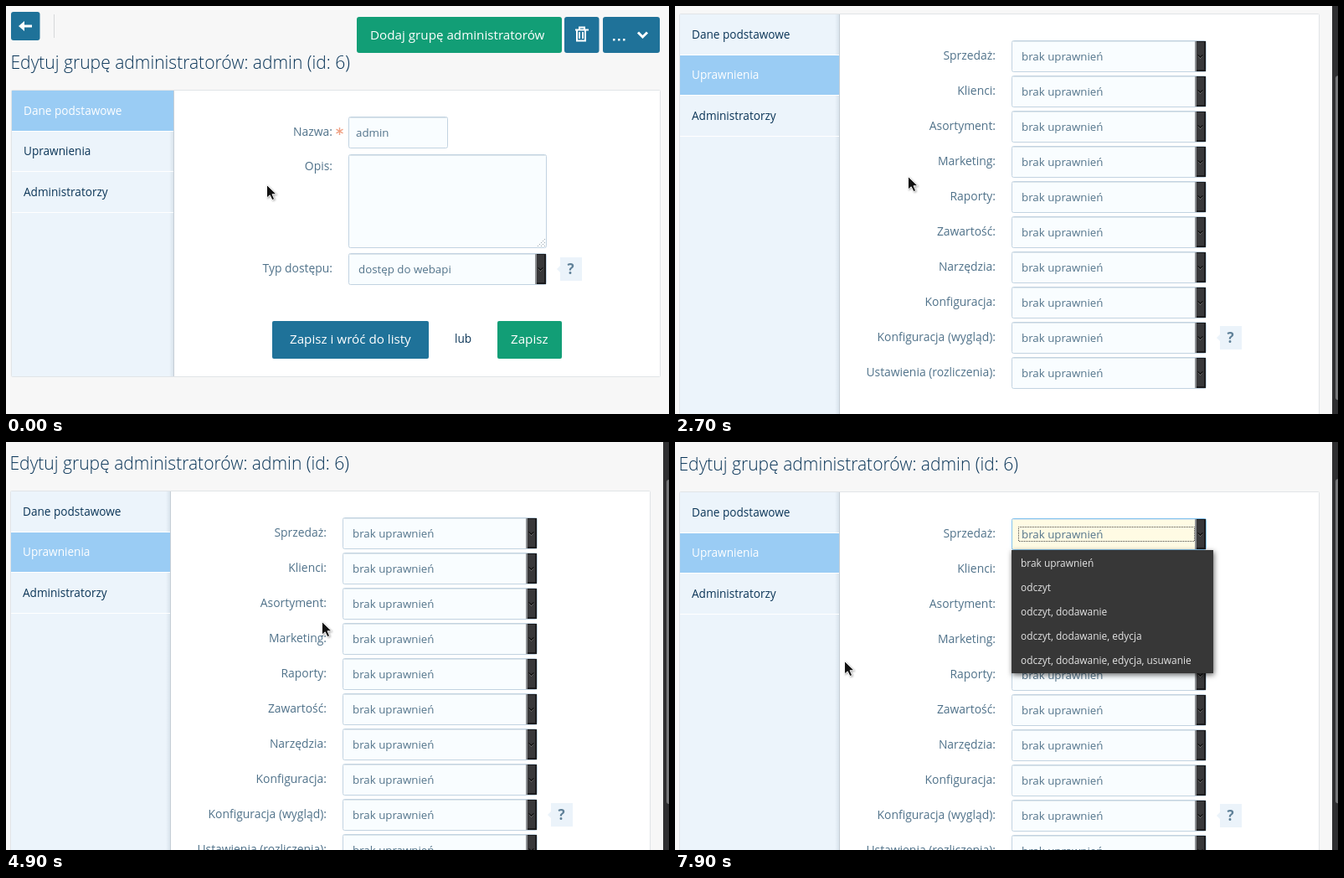
These frames come from a looping animation (792 px wide and 487 px high, 8 s). An HTML page:

```html
<!DOCTYPE html>
<html lang="pl">
<head>
<meta charset="utf-8">
<style>
  html, body { margin: 0; width: 100%; height: 100%; overflow: hidden; background: #f7f7f7; }
  svg { display: block; }
  text { font: 13.3px "Open Sans", sans-serif; fill: #53748b; white-space: pre; }
  .title { font-size: 21.05px; font-weight: 300; fill: #0b3659; }
  .button { font-size: 15.2px; fill: #fff; }
  .nav { font-size: 13.6px; fill: #0b3557; }
  .active { fill: #fff; }
  .label { font-size: 13.9px; fill: #50728a; text-anchor: end; }
  .help { font-size: 17px; font-weight: 700; fill: #5f8098; }
  .option { font-size: 11.92px; fill: #e4e4e4; }
  .field { fill: #f9fdff; stroke: #c2d3e1; }
  .icon { fill: none; stroke: #fff; stroke-width: 2; }
  #focus .field { fill: #fffbe4; stroke: #83c3ee; }
  #menu { filter: drop-shadow(1px 2px 3px #0009); }
</style>
</head>
<body>
<svg id="stage" width="792" height="487" viewBox="0 0 792 487"></svg>
<script>
const BLUE = '#1f7299', GREEN = '#129e76';

const rect = (x, y, w, h, fill, r = 0, more = '') =>
  `<rect x="${x}" y="${y}" width="${w}" height="${h}" fill="${fill}" rx="${r}" ${more}/>`;
const text = (x, y, s, cls = '') => `<text x="${x}" y="${y}" class="${cls}">${s}</text>`;
const path = (d, more = 'class="icon"') => `<path d="${d}" ${more}/>`;
const group = (id, body, more = '') => `<g id="${id}" ${more}>${body}</g>`;

const field = (x, y, w, h) =>
  rect(x + .5, y + .5, w - 1, h - 1, '', 2, 'class="field"') +
  rect(x + 1, y + 1, w - 2, 1, '#dde6ec');

const select = (x, y, w, value) => field(x, y, w, 38) +
  rect(x + w - 14, y + 1, 13, 36, '#1c1c1e') +
  rect(x + w - 14, y + 1, 2, 36, '#8d9093') +
  rect(x + w - 12, y + 2, 9, 33, '#38383a') +
  path(`M${x + w - 10.5} ${y + 18.5}l3 3 3-3`, 'fill="none" stroke="#aaa" stroke-width=".7"') +
  path(`M${x + w - 10.5} ${y + 17.5}l3 3 3-3`, 'fill="none" stroke="#0b0b0b" stroke-width="1.2"') +
  text(x + 12, y + 24, value);

const help = (x, y) => rect(x, y, 26, 28, '#ebf3fa') +
  path(`M${x} ${y + 10}l-4 4 4 4z`, 'fill="#ebf3fa"') + text(x + 8.5, y + 20, '?', 'help');

const header = (x, y, right, titleY) =>
  rect(x, 7, 34.5, 34, BLUE, 3) +
  path(`M${x + 25} 24H${x + 12}`, 'class="icon" style="stroke-width:3"') +
  path(`M${x + 9} 24l7-6v12z`, 'fill="#fff"') +
  rect(57, 10, 1, 28, '#d6d8da') +
  rect(right - 362, y, 245, 43, GREEN, 3) +
  text(right - 346, y + 27, 'Dodaj grupę administratorów', 'button') +
  rect(right - 114, y, 41.5, 43, BLUE, 3) +
  path(`M${right - 101} ${y + 15.5}h16m-11-1v-2h6v2m-9 2v12h10v-12m-7 1.5v8m4-8v8`) +
  rect(right - 68, y, 68, 43, BLUE, 3) +
  [0, 6, 12].map(d => rect(right - 56 + d, y + 26, 2.5, 2.5, '#fff')).join('') +
  path(`M${right - 26} ${y + 18.5}l5.5 5.5 5.5-5.5`, 'class="icon" style="stroke-width:3"') +
  text(x - .5, titleY, 'Edytuj grupę administratorów: admin (id: 6)', 'title');

const panel = (x, y, right, bottom, side, active) =>
  rect(x + .5, y + .5, right - x - 1, bottom - y, '#fff', 1, 'stroke="#e1e4e7"') +
  rect(x + 1, y + 1, side - x - 1, bottom - y - 1, '#ecf4fb') +
  rect(side - 5, y + 1, 5, bottom - y - 1, 'url(#edge)') +
  ['Dane podstawowe', 'Uprawnienia', 'Administratorzy'].map((name, i) => {
    const top = y + 1 + 48.5 * i, on = i === active;
    return (on ? rect(x + 1, Math.round(top), side - x - 1, 48, '#9accf4') : '') +
      rect(x + 1, Math.floor(top + 48), side - x - 1, 1, '#fff') +
      text(x + 15, Math.round(top + 28.6), name, on ? 'nav active' : 'nav');
  }).join('') +
  rect(side, y + 1, 1, bottom - y - 1, '#c6ced6');

const actions = (x, y) =>
  rect(x, y, 187, 45, BLUE, 2) + text(x + 21, y + 27, 'Zapisz i wróć do listy', 'button') +
  text(x + 218, y + 26, 'lub', 'nav') +
  rect(x + 269, y, 77, 45, GREEN, 2) + text(x + 285, y + 27, 'Zapisz', 'button');

const basics = header(6, 13, 781, 75) + panel(6, 100, 782, 442, 200, 0) +
  text(390, 155, 'Nazwa:', 'label') +
  path('M398.5 145v9m-4-6.8l8 4.6m0-4.6l-8 4.6', 'stroke="#f0a184" stroke-width="1.4"') +
  field(409, 132, 119, 38) + text(418, 156, 'admin') +
  text(390, 196, 'Opis:', 'label') + field(409, 177, 237, 112) +
  path('M635 287l9-9m-5 9l5-5m-1 5l1-1', 'stroke="#9aa5ad" stroke-dasharray="1.4"') +
  text(390, 318, 'Typ dostępu:', 'label') + select(409, 295, 237, 'dostęp do webapi') +
  help(662, 300) + actions(318, 376);

const NONE = 'brak uprawnień';
const sections = ['Sprzedaż', 'Klienci', 'Asortyment', 'Marketing', 'Raporty', 'Zawartość',
  'Narzędzia', 'Konfiguracja', 'Konfiguracja (wygląd)', 'Ustawienia (rozliczenia)'];
const rights = header(5, 12.5, 769, 91) + panel(5, 116, 770, 690, 196, 1) +
  sections.map((name, i) =>
    text(383, 171 + 42 * i, name + ':', 'label') + select(402, 148 + 42 * i, 233, NONE)).join('') +
  help(651, 489) + actions(310, 607) +
  group('focus', select(402, 148, 233, NONE) +
    rect(410.5, 158.5, 210, 17, 'none', 0, 'stroke="#444" stroke-dasharray="1" stroke-dashoffset=".5"'));

const options = [NONE, 'odczyt', 'odczyt, dodawanie', 'odczyt, dodawanie, edycja',
  'odczyt, dodawanie, edycja, usuwanie'];
const menu = rect(402, 129, 241, 147, '#373737') +
  rect(403, 130, 239, 28.5, '#444', 0, 'id="hover" stroke="#4b4b4b" stroke-width=".6"') +
  options.map((s, i) => text(413, 149 + 29 * i, s, 'option')).join('');

const arrow = path('M.5.5V16L4.2 12.8 7 18.6 9.6 17.4 7 11.7H12Z',
  'fill="#111" stroke="#fff" stroke-width=".9"');
const hand = path('M3 1Q5-.2 6 1.5L7.2 5.5 12 6.8Q14 7.5 13.7 10L13 16H5.5L.8 11.2Q-.2 9 2 8.7L4.6 9.4Z',
  'fill="#111" stroke="#fff" stroke-width=".9"') +
  path('M8 7v2.5m2.3-2v2.5m2-2v2.5', 'stroke="#fff" stroke-width=".7"');

stage.innerHTML =
  `<defs><linearGradient id="edge"><stop stop-color="#ecf4fb"/><stop offset="1" stop-color="#d9e3ec"/></linearGradient></defs>` +
  group('basicsPage', basics) + group('rightsPage', rights) +
  group('scrollbar', rect(785, 0, 7, 487, '#2f2f31') +
    rect(789, 0, 6, 387, '#77787a', 3, 'id="thumb"')) +
  group('menu', menu) +
  group('cursor', group('arrowShape', arrow, 'style="filter:drop-shadow(1px 1px 1px #0005)"') +
    group('handShape', hand));

// Keys: time, then values
const pointer = [
  [500, 311, 213], [1000, 210, 185], [1200, 155, 171], [1400, 129, 183], [1500, 123, 183],
  [1900, 123, 183], [2400, 278, 203], [3000, 278, 203], [3700, 475, 222], [3900, 527, 200],
  [4100, 500, 182], [4200, 500, 182], [4600, 377, 214], [5000, 377, 214], [5700, 421, 105],
  [6300, 421, 105], [6400, 428, 112], [6500, 428, 112], [7000, 440, 187], [7100, 440, 187],
  [7300, 440, 202], [7400, 440, 202], [7600, 350, 309], [7900, 202, 261]];
const scrolling = [[2400, 0], [2500, 25], [2700, 107], [2800, 135], [2900, 155], [3000, 167],
  [3100, 171], [4500, 171], [4600, 150], [4800, 72], [4900, 58], [5000, 57]];

function sample(keys, t) {
  const next = keys.findIndex(k => k[0] > t);
  if (next <= 0) return keys.at(next).slice(1);
  const a = keys[next - 1], b = keys[next], p = (t - a[0]) / (b[0] - a[0]);
  return a.slice(1).map((v, i) => Math.round(v + (b[i + 1] - v) * p));
}

const show = (el, on) => el.style.display = on ? '' : 'none';
const get = id => document.getElementById(id);

function draw(now) {
  const t = Math.floor(now % 8000 / 100) * 100; // ten steps per second
  const [x, y] = sample(pointer, t), [scroll] = sample(scrolling, t);
  const second = t >= 1700, open = t >= 5800;
  show(get('basicsPage'), !second);
  show(get('rightsPage'), second);
  show(get('scrollbar'), second);
  show(get('focus'), open);
  show(get('menu'), open);
  get('rightsPage').setAttribute('transform', `translate(0 ${-scroll})`);
  get('thumb').setAttribute('y', scroll * .778);

  const row = Math.max(0, Math.floor((y - 130) / 29));
  show(get('hover'), x >= 402 && row < options.length);
  get('hover').setAttribute('y', 130 + 29 * row);

  const overLink = x < 192 || second && !open && x > 398 && x < 630;
  show(get('handShape'), overLink);
  show(get('arrowShape'), !overLink);
  get('cursor').setAttribute('transform', `translate(${x} ${y})`);
  requestAnimationFrame(draw);
}
draw(performance.now());
</script>
</body>
</html>
```
